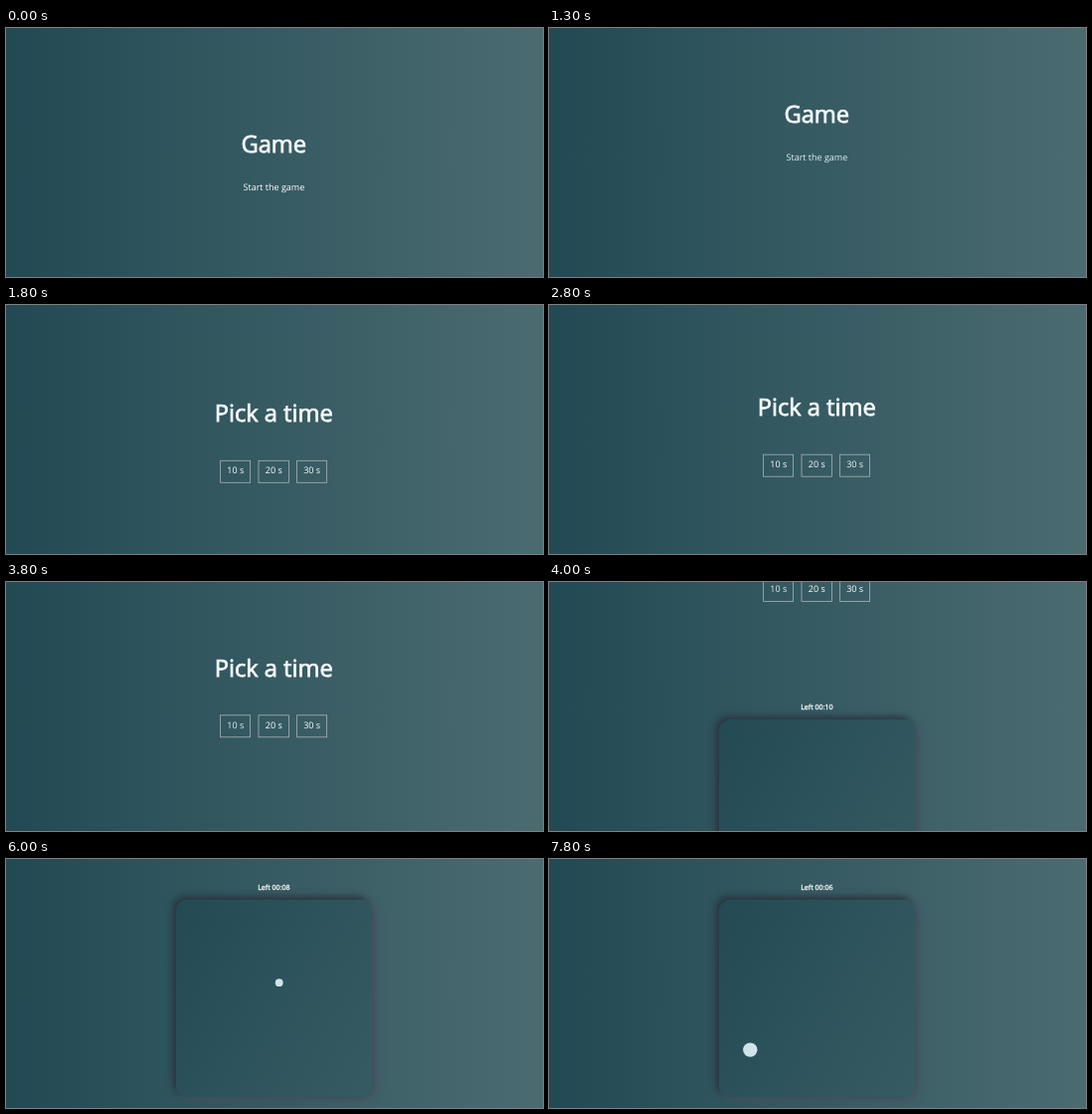
An HTML page for the animation above (8000 ms loop, 540x250 px).

```html
<!DOCTYPE html>
<html lang="en">
<head>
<meta charset="utf-8">
<title>Game</title>
<style>
  :root { --t: 0; --hover: #e2f0f3; }
  html, body { margin: 0; width: 100%; height: 100%; overflow: hidden; }
  body {
    position: relative;
    background: linear-gradient(90deg, #224a54, #4b6b71);
    font-family: "Open Sans", "Noto Sans", sans-serif;
  }

  /* The script moves --t in 100 ms ticks; every animation is seeked by it. */
  .anim {
    animation: 8s linear infinite paused;
    animation-delay: calc(var(--t) * -1ms);
  }

  .track { position: absolute; left: 0; top: 0; width: 540px; height: 750px; animation-name: slide; animation-timing-function: ease; }
  @keyframes slide {
    0%, 15.2% { transform: translateY(0); }
    24.325%, 46.775% { transform: translateY(-250px); }
    55.9%, 100% { transform: translateY(-500px); }
  }

  .board {
    position: absolute; left: 170.8px; top: 541.2px; width: 197.6px; height: 197.6px;
    border-radius: 11.9px;
    background: linear-gradient(118.38deg, #224a54 -4.6%, #4b6b71 200.44%);
    box-shadow: -3.2px -3.2px 7.9px #2a333d, 4px 2.8px 7.9px #475462;
  }

  svg { position: absolute; left: 0; top: 0; }
  text { fill: #fff; text-anchor: middle; text-rendering: geometricPrecision; }
  .title { font-size: 23.7px; fill: #f6fafc; stroke: #f6fafc; stroke-width: .75px; }
  .link { font-size: 9px; }
  .label { font-size: 7.1px; stroke: #fff; stroke-width: .28px; }
  rect { fill: none; stroke: #a7b2b5; stroke-width: .8px; }

  .start { animation-name: start; }
  @keyframes start { 0%, 8% { fill: #fff; } 11.25%, 100% { fill: var(--hover); } }
  .ten { animation-name: ten; }
  @keyframes ten { 0%, 36.25% { fill: #fff; } 38.75%, 100% { fill: var(--hover); } }
  .twenty { animation-name: twenty; }
  @keyframes twenty { 0%, 22.5% { fill: #fff; } 23.75%, 27.5% { fill: var(--hover); } 30%, 100% { fill: #fff; } }
  .thirty { animation-name: thirty; }
  @keyframes thirty { 0%, 27.5% { fill: #fff; } 30%, 33.75% { fill: var(--hover); } 36.25%, 100% { fill: #fff; } }

  .dot { fill: #cfe4ea; animation-name: hop; animation-timing-function: step-end; }
  @keyframes hop {
    0% { cx: 200px; cy: 727px; r: 8px; }
    63.75% { cx: 235px; cy: 602px; r: 9px; }
    75% { cx: 274.7px; cy: 624.2px; r: 3.9px; }
    83.75% { cx: 352px; cy: 608px; r: 10px; }
    95%, 100% { cx: 202.3px; cy: 691.6px; r: 7.2px; }
  }
</style>
</head>
<body>
<div class="track anim">
  <div class="board"></div>
  <svg width="540" height="750" viewBox="0 0 540 750">
    <text class="title" x="269.3" y="124.7">Game</text>
    <text class="link start anim" x="269.4" y="163">Start the game</text>

    <text class="title" x="269.2" y="361">Pick a time</text>
    <rect x="215.6" y="400.2" width="30" height="22"/>
    <rect x="254" y="400.2" width="30.4" height="22"/>
    <rect x="292.6" y="400.2" width="30" height="22"/>
    <text class="link ten anim" x="230.8" y="413.1">10 s</text>
    <text class="link twenty anim" x="269.3" y="413.1">20 s</text>
    <text class="link thirty anim" x="307.6" y="413.1">30 s</text>

    <text class="label" x="269.4" y="530.6">Left <tspan id="clock">00:10</tspan></text>
    <circle class="dot anim"/>
  </svg>
</div>
<script>
  const LOOP = 8000, TICK = 100, GAME_START = 3800;
  const root = document.documentElement;
  const clock = document.getElementById('clock');
  let origin;

  function draw(now) {
    origin ??= now;
    // a small lead keeps ticks from landing one refresh late
    const t = Math.floor((now - origin + 20) / TICK) * TICK % LOOP;
    const left = 10 - Math.max(0, Math.floor((t - GAME_START) / 1000));
    root.style.setProperty('--t', t);
    clock.textContent = '00:' + String(left).padStart(2, '0');
    requestAnimationFrame(draw);
  }
  requestAnimationFrame(draw);
</script>
</body>
</html>
```
